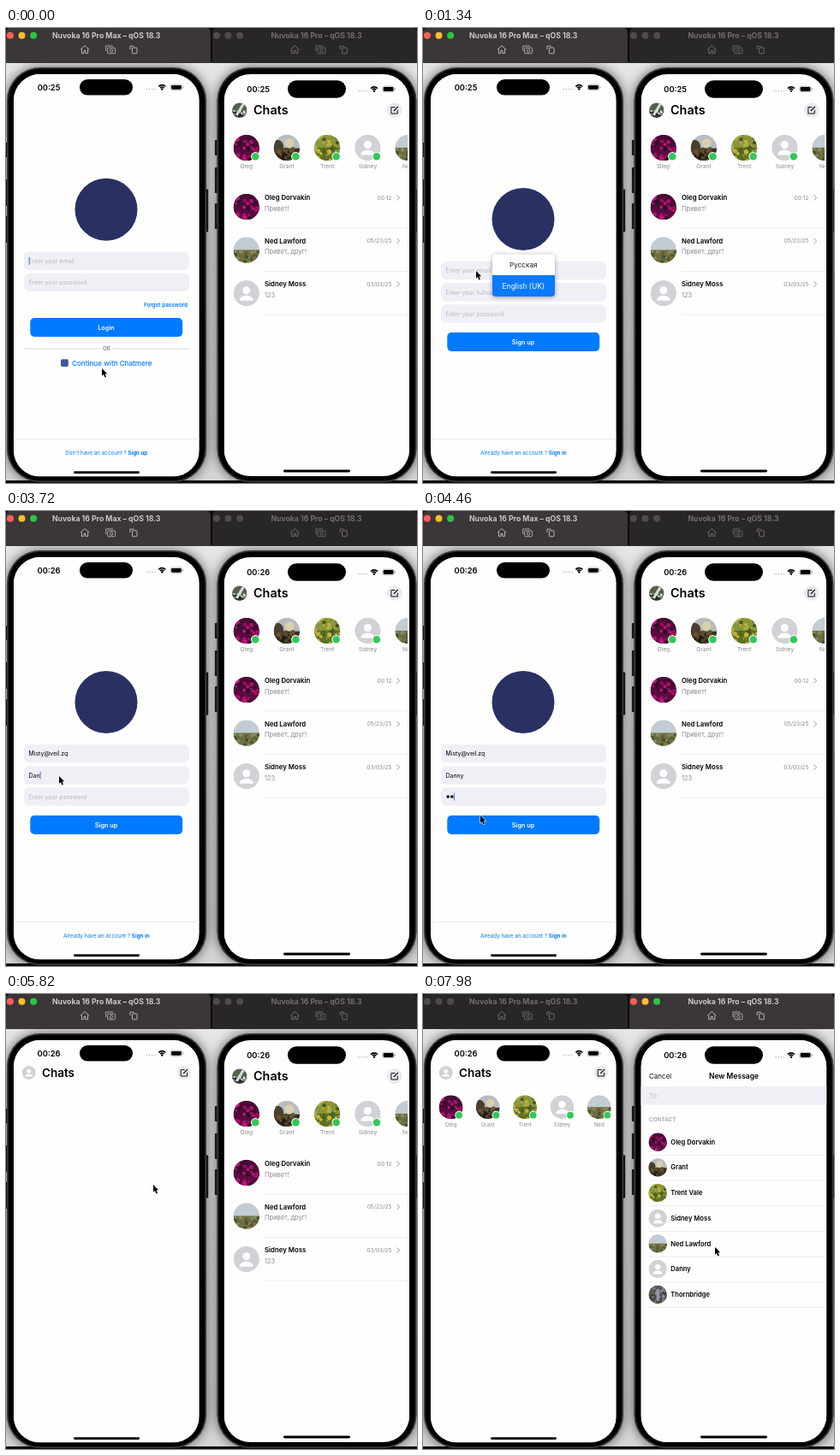
An HTML page with a canvas that plays this animation: 480 by 532 pixels, repeating every 8 s.

```html
<!DOCTYPE html>
<html lang="en">
<head>
<meta charset="utf-8">
<title>Chat sign-up</title>
<style>
html, body { margin: 0; width: 100%; height: 100%; overflow: hidden; background: #000; }
canvas { display: block; width: 480px; height: 532px; }
</style>
</head>
<body>
<canvas id="stage"></canvas>
<script>
const W = 480, H = 532, LOOP = 8000;
const BLUE = '#007aff', GRAY = '#8a8a8f', FIELD = '#f0eff6', LINE = '#e9e9eb', HINT = '#b9b9c1', PAPER = '#fefefe';
const canvas = document.getElementById('stage');
const c = canvas.getContext('2d');
const dpr = window.devicePixelRatio || 1;
canvas.width = W * dpr;
canvas.height = H * dpr;

const T = {
  signUp: 840, popup: 1250, popupFade: 1560, clock: 2090, name: 3270, password: 4200,
  chats: 5580, people: 6260, activate: 6800, press: 6840, release: 7120, sheetEnd: 7440
};
const EMAIL = 'Misty@veil.zq', NAME = 'Danny';
const emailKeys = [1700, 1750, 1800, 1860, 1920, 2120, 2200, 2380, 2680, 2760, 2830, 2880, 2960];
const nameKeys = [3510, 3590, 3680, 3770, 3860];
const passKeys = [4350, 4430, 4560, 4680, 4800, 4920];
const pointer = [
  [0, 112, 398], [520, 112, 398], [760, 154, 494], [880, 154, 494], [1190, 62, 284],
  [3000, 62, 284], [3250, 62, 310], [3960, 62, 310], [4160, 66, 334], [4220, 66, 334],
  [4420, 67, 356], [5140, 67, 356], [5260, 118, 362], [5400, 178, 306], [5540, 178, 306],
  [5800, 172, 223], [6240, 172, 223], [6780, 452, 96], [7240, 452, 96], [7440, 415, 180],
  [7700, 415, 180], [7960, 341, 296], [8000, 341, 296]
];
const people = [['Oleg', 0], ['Grant', 1], ['Trent', 2], ['Sidney', 3], ['Ned', 4]];
const chats = [
  ['Oleg Dorvakin', 'Привет!', '00:12', 0],
  ['Ned Lawford', 'Привет, друг!', '05/23/25', 4],
  ['Sidney Moss', '123', '03/03/25', 3]
];
const contacts = [
  ['Oleg Dorvakin', 0], ['Grant', 1], ['Trent Vale', 2], ['Sidney Moss', 3],
  ['Ned Lawford', 4], ['Danny', 3], ['Thornbridge', 5]
];
// sky, ground, speckle tones and horizon of each picture
const photos = {
  0: ['#4a0b38', '#5c0a42', ['#c4147a', '#a81468', '#251422', '#93105c'], 0],
  1: ['#b7bcc0', '#3c3020', ['#241d16', '#6b5330', '#4c4a2c'], 0.05],
  2: ['#8b9436', '#5f6f24', ['#c9b52e', '#3f5a1c', '#a8ab55'], 0],
  4: ['#c3cbd3', '#647044', ['#46542c', '#8d8a58', '#7c6b42'], 0],
  5: ['#5b6152', '#474e3c', ['#79718c', '#343a2c', '#8d8aa0'], 0],
  6: ['#56604a', '#2c3527', ['#d8dce0', '#232a20', '#87907e'], 0.1]
};

const clamp = v => Math.max(0, Math.min(1, v));
const smooth = v => v * v * (3 - 2 * v);
const typed = (keys, t) => keys.filter(k => k <= t).length;

function box(x, y, w, h, r, fill) {
  c.beginPath();
  c.roundRect(x, y, w, h, r);
  c.fillStyle = fill;
  c.fill();
}
function disc(x, y, r, fill) {
  c.beginPath();
  c.arc(x, y, r, 0, 7);
  c.fillStyle = fill;
  c.fill();
}
function path(points, color, width = 1) {
  c.beginPath();
  points.forEach(([x, y]) => c.lineTo(x, y));
  c.strokeStyle = color;
  c.lineWidth = width;
  c.stroke();
}
function frame(x, y, w, h, r, color, width = 1) {
  c.beginPath();
  c.roundRect(x, y, w, h, r);
  c.strokeStyle = color;
  c.lineWidth = width;
  c.stroke();
}
// y is the middle of the capitals
function text(s, x, y, size, color = '#000', weight = 400, align = 'left') {
  c.font = `${weight} ${size}px Inter, Roboto, sans-serif`;
  c.textAlign = align;
  c.fillStyle = color;
  c.fillText(s, x, y + size * 0.36);
  return c.measureText(s).width;
}
function rule(x0, x1, y, color = LINE) {
  c.fillStyle = color;
  c.fillRect(x0, y - 0.4, x1 - x0, 0.8);
}

function avatar(x, y, r, kind) {
  c.save();
  c.beginPath();
  c.arc(x, y, r, 0, 7);
  c.clip();
  if (kind === 3) {
    disc(x, y, r, '#d1d1d6');
    disc(x, y - r * 0.22, r * 0.3, '#fff');
    c.beginPath();
    c.ellipse(x, y + r * 0.57, r * 0.54, r * 0.4, 0, Math.PI, 0);
    c.closePath();
    c.fill();
  } else {
    const [sky, ground, tones, horizon] = photos[kind];
    let seed = kind * 37 + 11;
    const rnd = () => (seed = (seed * 16807) % 2147483647) / 2147483647;
    for (let i = 0; i < 5; i++) rnd();
    const full = kind === 0 || kind === 2 || kind === 5;
    disc(x, y, r, sky);
    c.fillStyle = ground;
    c.fillRect(x - r, y + horizon * r, 2 * r, r);
    if (kind === 1) {
      disc(x + r * 0.2, y - r * 0.35, r * 0.35, '#dccfac');
      disc(x - r * 0.75, y - r * 0.1, r * 0.5, '#4a4030');
    }
    for (let i = 0; i < 34; i++) {
      const px = x + (rnd() * 2 - 1) * r;
      const py = full ? y + (rnd() * 2 - 1) * r : y + (0.08 + rnd() * 0.9) * r;
      disc(px, py, r * (0.07 + rnd() * 0.11), tones[i % tones.length]);
    }
    if (kind === 6) path([[x + r * 0.5, y - r * 0.8], [x - r * 0.4, y + r * 0.7]], '#d8dce0', r * 0.35);
    if (kind === 5) box(x - r * 0.15, y - r * 0.6, r * 0.35, r * 1.3, 2, '#9a93ad');
  }
  c.restore();
}

function compose(x, y, r, alpha) {
  c.save();
  c.globalAlpha = alpha;
  disc(x, y, r, '#e9e9ee');
  path([[x + 0.8, y - 3.4], [x - 3.8, y - 3.4], [x - 3.8, y + 4], [x + 3.6, y + 4], [x + 3.6, y - 0.2]], '#111', 1);
  path([[x - 0.8, y + 1], [x + 4.2, y - 4.2]], '#111', 1.2);
  c.restore();
}

function titleBar(x, w, mid, title, active) {
  box(x, 0, w, 40.8, [5, 5, 0, 0], active ? '#3b3637' : '#282626');
  const lights = active ? ['#ff5f57', '#febc2e', '#28c840'] : ['#4f4b4c', '#4f4b4c', '#4f4b4c'];
  lights.forEach((col, i) => disc(x + 4.9 + i * 13.6, 8.8, 4, col));
  text(title, mid, 8.6, 8.7, active ? '#cbc6c7' : '#726d6e', 700, 'center');
  const ink = active ? '#b9b4b5' : '#716c6d';
  const a = mid - 25.2, b = mid + 4.8, d = mid + 32;
  path([[a - 5, 25.2], [a, 20.6], [a + 5, 25.2]], ink, 1);
  path([[a - 3.6, 24.5], [a - 3.6, 29.6], [a - 1, 29.6], [a - 1, 26.4], [a + 1, 26.4], [a + 1, 29.6],
    [a + 3.6, 29.6], [a + 3.6, 24.5]], ink, 1);
  path([[b - 5.3, 27], [b - 5.3, 21], [b + 3, 21]], ink, 0.9);
  frame(b - 3.4, 23.2, 9, 6.6, 1, ink, 0.9);
  c.beginPath();
  c.arc(b + 1.1, 26.5, 1.7, 0, 7);
  c.stroke();
  frame(d - 1.8, 23, 5.6, 6.8, 0.8, ink, 1);
  path([[d - 4.3, 25], [d - 4.3, 21.2], [d + 0.3, 21.2]], ink, 1);
}

function phoneBody(x, w, side) {
  for (const [y, h] of side) box(x - 2.6, y, 4, h, 1, '#1c1c1e');
  box(x + w - 1.4, 188.5, 3.6, 50, 1, '#1c1c1e');
  c.save();
  c.shadowColor = 'rgba(0,0,0,.6)';
  c.shadowBlur = 14 * dpr;
  box(x, 46, w, 485, 39, '#2e2e30');
  c.restore();
  frame(x + 0.6, 46.6, w - 1.2, 483.8, 38, '#4a4a4c', 0.7);
  box(x + 1.8, 47.8, w - 3.6, 481.4, 37, '#000');
}

function statusBar(x, y, islandX, islandW, islandH, iconX, time) {
  text(time, x, y, 9.3, '#000', 600, 'center');
  box(islandX, y - islandH / 2, islandW, islandH, islandH / 2, '#000');
  for (let i = 0; i < 4; i++) disc(iconX + i * 3.2, y + 2.2, 0.8, '#b5b5b8');
  const wx = iconX + 18;
  c.strokeStyle = '#000';
  c.lineWidth = 1.7;
  for (const r of [3, 5.4]) {
    c.beginPath();
    c.arc(wx, y + 2.8, r, -Math.PI * 0.76, -Math.PI * 0.24);
    c.stroke();
  }
  disc(wx, y + 2.2, 1.2, '#000');
  frame(iconX + 27.8, y - 3.3, 13.6, 6.6, 2.1, '#9a9a9a', 0.7);
  box(iconX + 28.7, y - 2.4, 11.8, 4.8, 1.4, '#000');
  box(iconX + 42.2, y - 1, 0.9, 2, 0.4, '#9a9a9a');
}

function caret(x, y) {
  box(x, y - 4.6, 0.9, 9.2, 0.4, '#3f68c8');
}
function field(y, value, hint, focused) {
  box(21, y - 10.7, 193, 21.4, 6, FIELD);
  const w = value ? text(value, 26.5, y, 6.95) : 0;
  if (!value) text(hint, 26.5, y, 6.95, HINT);
  if (focused) caret(26.7 + w, y);
}
function passField(y, count, focused) {
  if (!count) return field(y, '', 'Enter your password', focused);
  box(21, y - 10.7, 193, 21.4, 6, FIELD);
  for (let i = 0; i < count; i++) disc(29.2 + i * 4.6, y, 1.8, '#000');
  if (focused) caret(26.8 + count * 4.6, y);
}
function button(label, y) {
  box(28.3, y - 10.9, 177.9, 21.8, 4.8, BLUE);
  text(label, 117, y, 7.3, '#fff', 600, 'center');
}
function footer(lead, link) {
  const size = 6.25;
  rule(8, 227, 480.7);
  c.font = `400 ${size}px Inter, Roboto, sans-serif`;
  const a = c.measureText(lead).width;
  c.font = `700 ${size}px Inter, Roboto, sans-serif`;
  const x = 117.3 - (a + c.measureText(link).width) / 2;
  text(lead, x, 496.3, size, BLUE);
  text(link, x + a, 496.3, size, BLUE, 700);
}

function loginScreen() {
  disc(117, 212.3, 36.5, '#293163');
  field(272.3, '', 'Enter your email', true);
  field(297.4, '', 'Enter your password', false);
  text('Forgot password', 212, 323.5, 6.3, BLUE, 600, 'right');
  button('Login', 350);
  rule(20, 110, 375, '#cfcfd2');
  rule(125, 214, 375, '#cfcfd2');
  text('OR', 117.3, 375, 6.2, GRAY, 600, 'center');
  box(64, 387.2, 8.8, 8.8, 1.8, '#3b5998');
  text('Continue with Chatmere', 77, 391.8, 8.1, BLUE, 500);
  footer("Don't have an account ? ", 'Sign up');
}

function signUpScreen(t) {
  disc(117, 223.5, 36.5, '#293163');
  field(283.6, EMAIL.slice(0, typed(emailKeys, t)), 'Enter your email', t > 1700 && t < T.name);
  field(309, NAME.slice(0, typed(nameKeys, t)), 'Enter your fullname', t >= T.name && t < T.password);
  passField(334, typed(passKeys, t), t >= T.password);
  button('Sign up', 367);
  footer('Already have an account ? ', 'Sign in');
}

function languagePopup(t) {
  if (t < T.popup) return;
  const alpha = 1 - clamp((t - T.popupFade) / 180);
  if (!alpha) return;
  c.save();
  c.globalAlpha = alpha;
  c.save();
  c.shadowColor = 'rgba(0,0,0,.35)';
  c.shadowBlur = 5 * dpr;
  c.shadowOffsetY = dpr;
  box(81, 264.5, 73, 49.5, 4, '#fff');
  c.restore();
  box(81, 289, 73, 25, [0, 0, 4, 4], '#0a7aff');
  text('Русская', 117.3, 277.3, 8.2, '#1c1c1c', 400, 'center');
  text('English (UK)', 117.3, 301.8, 8.5, '#fff', 400, 'center');
  c.restore();
}

function stories(x, step, y, r, labelY, size) {
  people.forEach(([name, kind], i) => {
    const px = x + i * step;
    avatar(px, y, r, kind);
    disc(px + r * 0.69, y + r * 0.68, r * 0.35, '#fff');
    disc(px + r * 0.69, y + r * 0.68, r * 0.28, '#34c759');
    text(name, px, labelY, size, GRAY, 400, 'center');
  });
}

function leftChats(t) {
  avatar(26.7, 92, 8.1, 3);
  text('Chats', 42, 92.2, 13.5, '#000', 600);
  compose(208, 92, 8.2, 1);
  if (t >= T.people) stories(32.5, 43.3, 132.2, 13.9, 153, 6.2);
}

function rightChats(t) {
  avatar(272.8, 96, 8.7, 6);
  text('Chats', 289, 96.3, 14.4, '#000', 600);
  compose(453.7, 96, 8.8, t >= T.press && t < T.release ? 0.22 : 1);
  c.save();
  c.beginPath();
  c.rect(255, 110, 214, 70);
  c.clip();
  stories(280.8, 47.2, 139.9, 15.2, 161.7, 6.7);
  c.restore();
  chats.forEach(([name, message, time, kind], i) => {
    const y = 198.4 + i * 50.6;
    avatar(280.8, y + 10.5, 15.2, kind);
    text(name, 302, y, 7.8, '#000', 600);
    text(message, 302, y + 12.4, 7.5, GRAY);
    text(time, 450.5, y - 0.2, 6.6, GRAY, 400, 'right');
    path([[456.5, y - 3], [459.7, y], [456.5, y + 3]], '#97979c', 1);
    rule(302, 470, y + 35.5);
  });
}

function newMessage() {
  text('Cancel', 264, 96.3, 8, '#111');
  text('New Message', 363, 96.3, 8.5, '#000', 600, 'center');
  c.fillStyle = FIELD;
  c.fillRect(254, 108, 218, 21.5);
  text('To:', 264, 119, 7.7, '#bfbfc6');
  text('CONTACT', 264, 146.2, 6.5, GRAY);
  contacts.forEach(([name, kind], i) => {
    const y = 173 + i * 29.7;
    avatar(274.2, y, 10.7, kind);
    text(name, 289.3, y, 7.6, '#000', 600);
    rule(264, 470, y + 15.4);
  });
}

function screen(x, y, w, h, draw) {
  c.save();
  c.beginPath();
  c.roundRect(x, y, w, h, 31);
  c.clip();
  c.fillStyle = PAPER;
  c.fillRect(x, y, w, h);
  draw();
  c.restore();
}

function drawPointer(t) {
  let i = 1;
  while (i < pointer.length - 1 && pointer[i][0] < t) i++;
  const [t0, x0, y0] = pointer[i - 1], [t1, x1, y1] = pointer[i];
  const k = smooth(clamp((t - t0) / (t1 - t0)));
  c.save();
  c.translate(x0 + (x1 - x0) * k, y0 + (y1 - y0) * k);
  c.scale(0.88, 0.88);
  c.beginPath();
  [[0, 0], [0, 10], [2.2, 8], [3.9, 12], [5.7, 11.2], [4, 7.4], [7, 7.2]].forEach(([x, y]) => c.lineTo(x, y));
  c.closePath();
  c.lineJoin = 'round';
  c.strokeStyle = '#fff';
  c.lineWidth = 1.2;
  c.stroke();
  c.fillStyle = '#000';
  c.fill();
  c.restore();
}

function desktop() {
  c.fillStyle = '#0c0b0b';
  c.fillRect(0, 0, W, H);
  const g = c.createLinearGradient(0, 40, 0, 529);
  g.addColorStop(0, '#e6e6e6');
  g.addColorStop(1, '#d6d6d6');
  c.fillStyle = g;
  c.fillRect(0, 40, W, 489);
}

function draw(t) {
  c.setTransform(dpr, 0, 0, dpr, 0, 0);
  const time = t < T.clock ? '00:25' : '00:26';
  const rightActive = t >= T.activate;
  desktop();
  phoneBody(1, 233, [[134, 17], [177, 31], [220, 31]]);
  phoneBody(246.5, 233, [[131, 18], [163, 30], [205, 30]]);
  c.fillStyle = '#0c0b0b';
  c.fillRect(0, 0, W, 40.8);
  c.fillRect(0, 531, W, 1);
  titleBar(0, 239, 117.2, 'Nuvoka 16 Pro Max – qOS 18.3', !rightActive);
  titleBar(241, 239, 362.5, 'Nuvoka 16 Pro – qOS 18.3', rightActive);

  screen(8.8, 53.8, 217, 470.8, () => {
    if (t < T.signUp) loginScreen();
    else if (t < T.chats) signUpScreen(t);
    else leftChats(t);
    statusBar(50, 69.3, 86, 62, 18.6, 164.3, time);
    box(79, 518.2, 77, 2.7, 1.3, '#000');
  });
  screen(254.6, 54, 216.6, 470, () => {
    rightChats(t);
    const rise = clamp((t - T.release) / (T.sheetEnd - T.release));
    if (rise > 0) {
      c.save();
      c.translate(0, 470 * Math.pow(1 - rise, 3));
      c.fillStyle = PAPER;
      c.fillRect(254, 54, 218, 471);
      newMessage();
      c.restore();
    }
    statusBar(294.7, 71.5, 329, 68, 20.4, 412, time);
    box(324, 516.6, 78, 2.8, 1.4, '#000');
  });
  languagePopup(t);
  drawPointer(t);
}

function tick() {
  draw(performance.now() % LOOP);
  requestAnimationFrame(tick);
}
tick();
</script>
</body>
</html>
```
